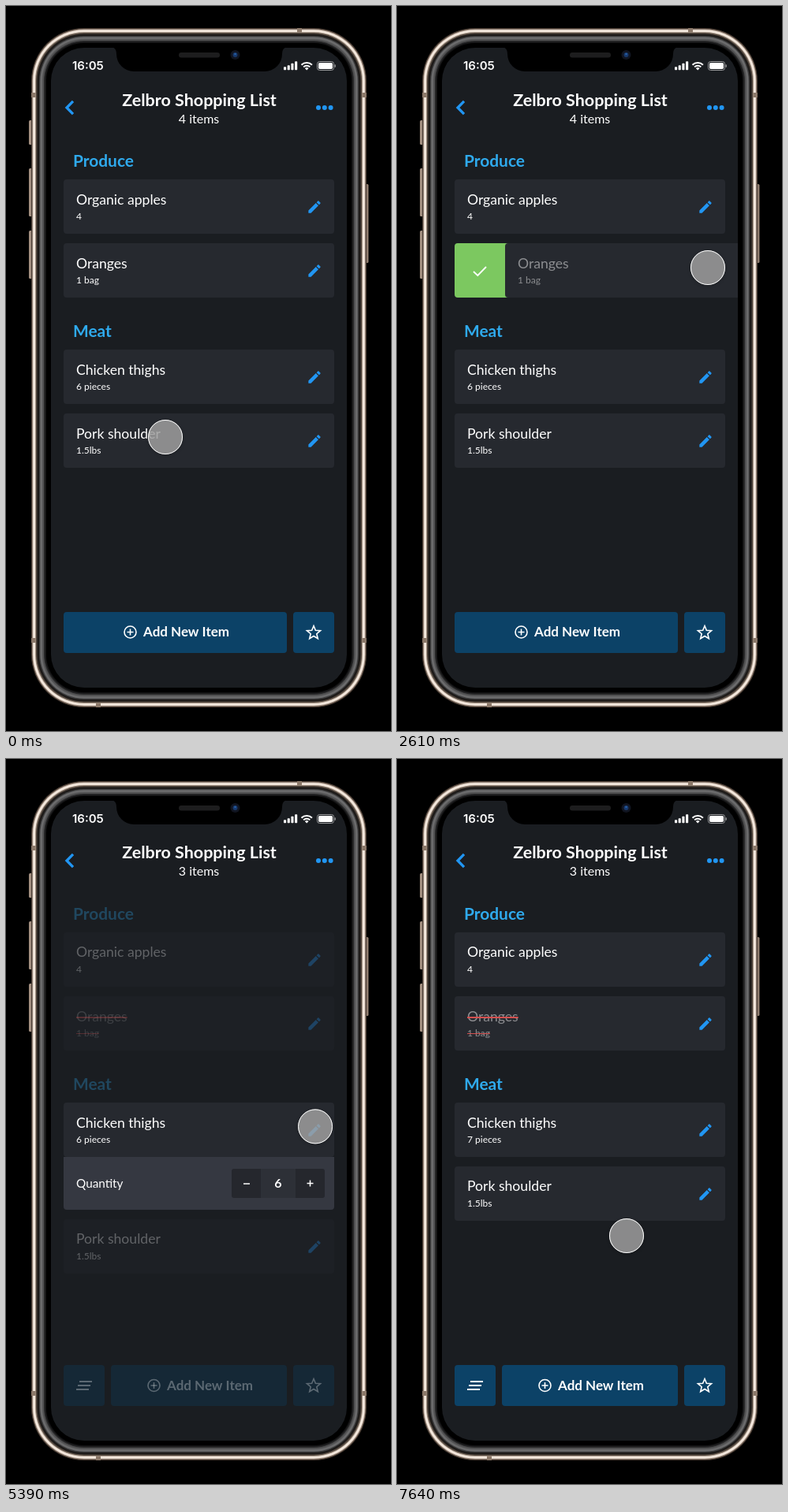
These frames come from a looping animation (488 px wide and 920 px high, 8 s). An HTML page with a canvas:

```html
<!DOCTYPE html>
<html lang="en">
<head>
<meta charset="utf-8">
<title>Shopping list</title>
<style>
html, body { margin: 0; width: 488px; height: 920px; overflow: hidden; background: #000; }
canvas { display: block; }
</style>
</head>
<body>
<canvas id="stage" width="488" height="920"></canvas>
<script>
const ctx = document.getElementById('stage').getContext('2d');
const LOOP = 8000;
const BG = '#1a1d21', CARD = '#26292f', BLUE = '#2196f3', HEADING = '#2faaed', BUTTON = '#0c4267', WHITE = '#fff';
const LATO = 'Lato, "Open Sans", sans-serif';
const PENCIL = new Path2D('M3 17.25V21h3.75L17.81 9.94l-3.75-3.75L3 17.25z' +
  'M20.71 7.04c.39-.39.39-1.02 0-1.41l-2.34-2.34c-.39-.39-1.02-.39-1.41 0l-1.83 1.83 3.75 3.75 1.83-1.83z');

// Pointer moves: start, end, target x, target y
const MOVES = [
  [1090, 1870, 216, 335],
  [2150, 2430, 394, 332],
  [3735, 4430, 392, 466],
  [5375, 5710, 400, 530],
  [6685, 7340, 291, 605]
];

const span = (t, from, to) => Math.min(1, Math.max(0, (t - from) / (to - from)));
const easeOut = u => 1 - Math.pow(1 - u, 1.67);
const easeInOut = u => (1 - Math.cos(Math.PI * u)) / 2;

function faded(alpha, draw) {
  if (alpha <= 0) return;
  ctx.save();
  ctx.globalAlpha *= alpha;
  draw();
  ctx.restore();
}

function box(x, y, w, h, r, color) {
  ctx.beginPath();
  ctx.roundRect(x, y, w, h, r);
  ctx.fillStyle = color;
  ctx.fill();
}

function disc(x, y, r, color) {
  ctx.beginPath();
  ctx.arc(x, y, r, 0, Math.PI * 2);
  ctx.fillStyle = color;
  ctx.fill();
}

function line(points, width, color = WHITE) {
  ctx.beginPath();
  points.forEach(([x, y]) => ctx.lineTo(x, y));
  ctx.lineWidth = width;
  ctx.strokeStyle = color;
  ctx.stroke();
}

function text(str, x, y, size, { weight = 400, color = WHITE, align = 'left', family = LATO } = {}) {
  ctx.font = `${weight} ${size}px ${family}`;
  ctx.textAlign = align;
  ctx.fillStyle = color;
  ctx.fillText(str, x, y);
  return ctx.measureText(str).width;
}

function plus(x, y, r, width) {
  line([[x - r, y], [x + r, y]], width);
  line([[x, y - r], [x, y + r]], width);
}

function drawBody() {
  const metal = '#8b7869';
  [[145, 31], [206, 61], [285, 61]].forEach(([y, h]) => box(29, y, 5, h, 1.5, '#a38f80'));
  box(455, 226, 4.5, 100, 1.5, '#8f7c6e');
  const rings = [[0, '#4a3d34'], [1.2, '#a08f82'], [2.2, '#f4e8dd'], [5, '#a39486'], [6, '#54483f'], [7.5, '#1d1a18'],
    [10, '#3c3c3d'], [11.3, '#6b6b6c'], [14, '#525253'], [16, '#2a2a2b'], [17.5, '#141415'], [19, '#000']];
  for (const [d, color] of rings) box(32 + d, 28 + d, 425 - 2 * d, 862 - 2 * d, 67 - d, color);
  for (const y of [110, 802]) {
    box(32, y, 5.5, 6, 0, metal);
    box(451.5, y, 5.5, 6, 0, metal);
  }
  box(369, 28, 6, 5.5, 0, metal);
  box(114, 884.5, 6, 5.5, 0, metal);
}

function drawNotch() {
  ctx.beginPath();
  ctx.moveTo(132, 52);
  ctx.quadraticCurveTo(140, 52, 140, 61);
  ctx.arcTo(140, 83, 162, 83, 22);
  ctx.lineTo(328, 83);
  ctx.arcTo(350, 83, 350, 61, 22);
  ctx.quadraticCurveTo(350, 52, 358, 52);
  ctx.fillStyle = '#000';
  ctx.fill();
  box(219, 59, 52, 6.5, 3.3, '#1d1d1e');
  disc(290.5, 62, 6, '#111521');
  disc(290.5, 62, 3, '#17386c');
  disc(290.5, 61, 1.2, '#2a62a8');
}

function drawStatus() {
  text('16:05', 84, 81, 15, { weight: 600, family: 'Inter, sans-serif' });
  [4, 6, 8.5, 11].forEach((h, i) => box(352 + i * 4.7, 81.3 - h, 3.1, h, 0.8, WHITE));
  for (const [r, width] of [[1.7, 3.4], [5.8, 2], [9.5, 2.1]]) {
    ctx.beginPath();
    ctx.arc(381.2, 81.5, r, -Math.PI * 0.75, -Math.PI * 0.25);
    ctx.lineWidth = width;
    ctx.strokeStyle = WHITE;
    ctx.stroke();
  }
  ctx.beginPath();
  ctx.roundRect(394.5, 70.5, 21, 11, 3);
  ctx.lineWidth = 1;
  ctx.strokeStyle = '#9a9b9d';
  ctx.stroke();
  box(396, 72, 18, 8, 1.8, WHITE);
  box(416.6, 74.2, 1.3, 3.6, 0.7, '#9a9b9d');
}

function drawHeader(bought, lift) {
  line([[85, 120.8], [77, 129], [85, 137.2]], 3.3, BLUE);
  [396, 403.8, 411.6].forEach(x => disc(x, 129, 3, BLUE));
  text('Zelbro Shopping List', 245, 127 - lift, 21.5, { weight: 700, align: 'center' });
  faded(1 - bought, () => text('4 items', 244.5, 149 - lift, 16, { align: 'center' }));
  faded(bought, () => text('3 items', 244.5, 149 - lift, 16, { align: 'center' }));
}

function drawRow(y, name, details, { dx = 0, ink = 1, strike = 0, lift = 0 } = {}) {
  box(73 + dx, y, 343, 69, 4, CARD);
  const x = 89 + dx;
  let nameWidth, detailWidth;
  faded(ink, () => {
    nameWidth = text(name, x, y + 32 - lift, 17.6);
    for (const [str, alpha] of details) faded(alpha, () => { detailWidth = text(str, x, y + 51, 12); });
  });
  faded(strike, () => {
    line([[x, y + 27], [x + nameWidth, y + 27]], 1.8, '#d4504f');
    line([[x, y + 47.5], [x + detailWidth, y + 47.5]], 1.2, '#d4504f');
  });
  ctx.save();
  ctx.translate(391 + dx, y + 35);
  ctx.scale(0.85, 0.85);
  ctx.translate(-12, -12);
  ctx.fillStyle = BLUE;
  ctx.fill(PENCIL);
  ctx.restore();
}

function drawOranges(slide, swiped, bought) {
  if (slide > 0) {
    box(73, 301, Math.min(slide + 4, 68), 69, [4, 0, 0, 4], '#7cc860');
    faded(slide / 64, () => line([[97, 337], [102.3, 342], [113, 331]], 1.8));
  }
  drawRow(301, 'Oranges', [['1 bag', 1]], { dx: slide, ink: 1 - 0.53 * swiped, strike: bought });
}

function drawStepper(bumped) {
  box(73, 505, 343, 67, [0, 0, 4, 4], '#353841');
  text('Quantity', 89, 544, 15.3);
  box(286, 520, 118, 37, 3, '#25272d');
  box(323, 520, 44, 37, 0, '#2d3037');
  line([[301, 539], [309, 539]], 1.5);
  plus(385.5, 538.5, 4, 1.5);
  const digit = { weight: 700, align: 'center' };
  faded(1 - bumped, () => text('6', 345, 543.5, 16, digit));
  faded(bumped, () => text('7', 345, 543.5, 16, digit));
}

function drawFooter(bought) {
  faded(bought, () => {
    box(73, 769, 52, 52, 4, BUTTON);
    [[93, 790], [91, 795], [89, 800]].forEach(([x, y]) => line([[x, y], [x + 16, y]], 2));
  });
  const left = 73 + 60 * bought, shift = 30 * bought, y = 794.5 + 0.5 * bought;
  box(left, 769, 356 - left, 52, 4, BUTTON);
  ctx.beginPath();
  ctx.arc(157.5 + shift, y, 7.5, 0, Math.PI * 2);
  ctx.lineWidth = 1.6;
  ctx.strokeStyle = WHITE;
  ctx.stroke();
  plus(157.5 + shift, y, 4, 1.6);
  text('Add New Item', 174 + shift, y + 5.8, 17, { weight: 700 });

  box(364, 769, 52, 52, 4, BUTTON);
  ctx.beginPath();
  for (let i = 0; i < 10; i++) {
    const r = i % 2 ? 4 : 9, a = (i / 5 - 0.5) * Math.PI;
    ctx.lineTo(390 + r * Math.cos(a), 795.5 + r * Math.sin(a));
  }
  ctx.closePath();
  ctx.lineWidth = 1.6;
  ctx.stroke();
}

function drawPointer(t) {
  let x = 202, y = 547;
  for (const [from, to, tx, ty] of MOVES) {
    const k = easeInOut(span(t, from, to));
    x += (tx - x) * k;
    y += (ty - y) * k;
  }
  ctx.save();
  ctx.shadowColor = 'rgba(0,0,0,.3)';
  ctx.shadowBlur = 4;
  ctx.shadowOffsetY = 1;
  disc(x, y, 22, 'rgba(168,168,168,.8)');
  ctx.restore();
  ctx.beginPath();
  ctx.arc(x, y, 21.5, 0, Math.PI * 2);
  ctx.lineWidth = 1;
  ctx.strokeStyle = WHITE;
  ctx.stroke();
}

function draw(t) {
  const swiped = easeOut(span(t, 2150, 2430));
  const bought = easeOut(span(t, 3020, 3320));
  const opened = easeOut(span(t, 4440, 4770));
  const closed = easeOut(span(t, 7310, 7640));
  const bumped = easeOut(span(t, 5930, 6330));
  const open = opened - closed;
  const slide = 64 * (swiped - bought);
  const dim = 1 - 0.7 * open;

  ctx.fillStyle = '#000';
  ctx.fillRect(0, 0, 488, 920);
  drawBody();
  ctx.save();
  ctx.beginPath();
  ctx.roundRect(57, 53, 375, 812, 42);
  ctx.clip();
  ctx.fillStyle = BG;
  ctx.fillRect(57, 53, 375, 812);
  drawNotch();
  drawStatus();
  drawHeader(bought, opened);
  faded(dim, () => {
    text('Produce', 85, 204, 20.9, { weight: 700, color: HEADING });
    text('Meat', 85, 420, 20.9, { weight: 700, color: HEADING });
    drawRow(220, 'Organic apples', [['4', 1]], { lift: opened });
    drawOranges(slide, swiped, bought);
    drawRow(517 + 67 * open, 'Pork shoulder', [['1.5lbs', 1]], { lift: opened });
    drawFooter(bought);
  });
  faded(open, () => drawStepper(bumped));
  drawRow(436, 'Chicken thighs', [['6 pieces', 1 - closed], ['7 pieces', closed]]);
  drawPointer(t);
  ctx.restore();
}

function tick() {
  draw(performance.now() % LOOP);
  requestAnimationFrame(tick);
}
tick();
</script>
</body>
</html>
```
